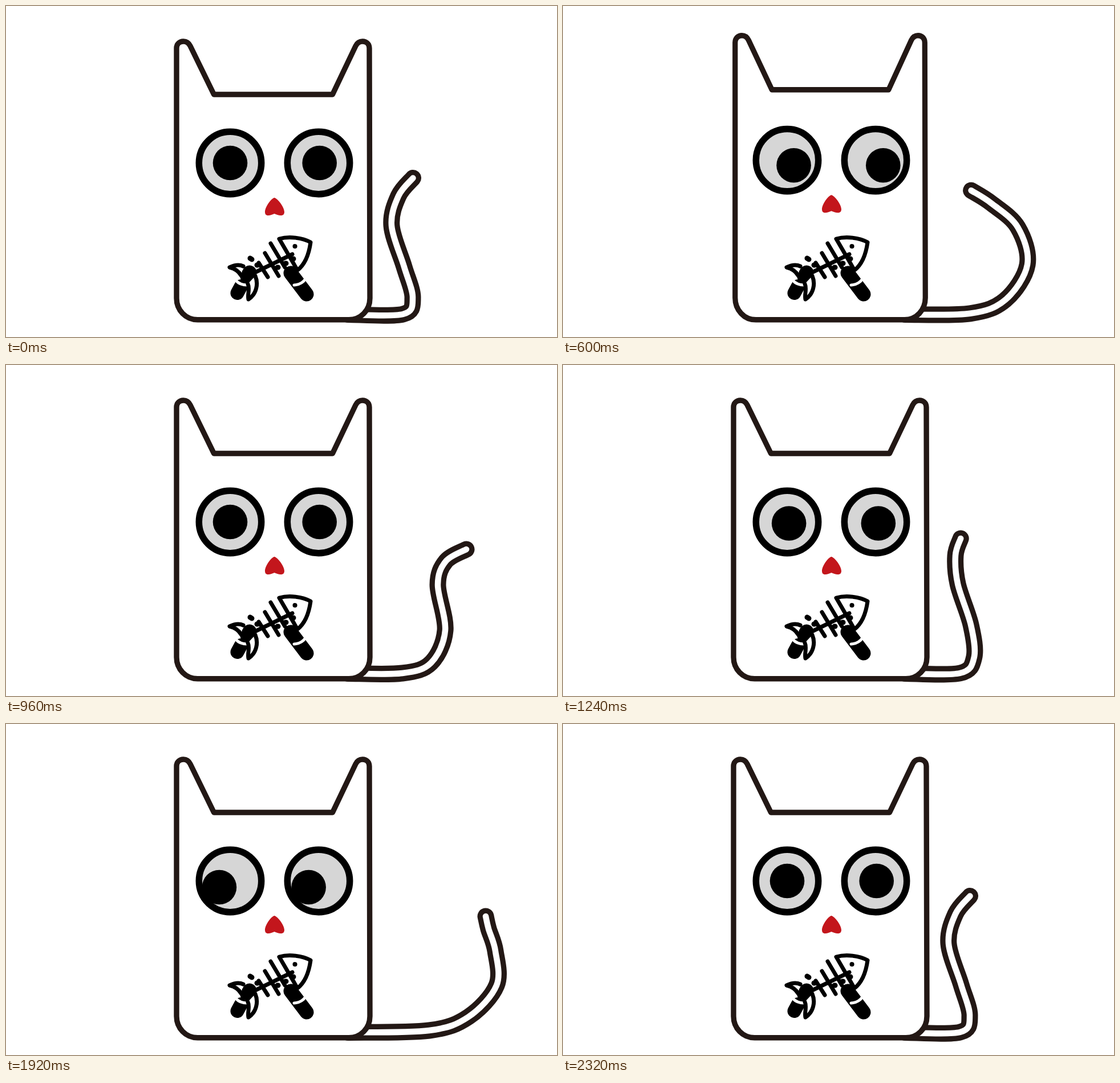
Animation, 966 px wide and 580 px high, one loop 2.36 s. Source, as an HTML page:

```html
<!DOCTYPE html>
<html lang="en">
<head>
<meta charset="utf-8">
<title>Cat</title>
<style>
  html, body { margin: 0; height: 100%; overflow: hidden; background: #fff; }
  svg { display: block; }
  .tail { fill: none; stroke: #231815; stroke-width: 29; stroke-linecap: round; }
  .tail.inside { stroke: #fff; stroke-width: 10.5; }
  .body { fill: #fff; stroke: #231815; stroke-width: 9.4; stroke-linejoin: round; }
  .fish { fill: none; stroke: #000; stroke-width: 7; stroke-linecap: round; stroke-linejoin: round; }
</style>
</head>
<body>
<svg width="966" height="580" viewBox="0 0 966 580">
  <path class="tail"/>
  <path class="tail inside"/>
  <path id="body" class="body" d="M364.5 155 L323 70 C320 64 316 62 311 62 C304 62 299 67 299 74
    V512 C299 533 315 549.8 336 549.8 H601 C622 549.8 638 533 638 512
    L637 74 C637 67 632 62 625 62 C620 62 616 64 613 70 L572.5 155 Z"/>
  <g id="face">
    <g fill="#d6d6d6" stroke="#000" stroke-width="11.5">
      <circle cx="393" cy="275" r="54.7"/>
      <circle cx="548" cy="275" r="54.7"/>
    </g>
    <g id="pupils">
      <circle cx="393" cy="275" r="30.3"/>
      <circle cx="549.7" cy="275" r="30.3"/>
    </g>
    <path fill="#c3161c" d="M470.5 336 C476 337 488 352 488 361 C488 370 477 367 470.5 364
      C464 367 454 370 454 361 C454 352 465 337 470.5 336 Z"/>
  </g>
  <g class="fish">
    <path stroke-width="25" d="M499 468 L527 505"/>
    <path stroke-width="24" d="M412 491 L405.5 503"/>
    <path stroke-width="25" d="M427 467 L423 474"/>
    <path fill="#fff" d="M479 408 C496 403 520 406 534 414 C531 436 524 453 511 463 Z"/>
    <path stroke="#fff" stroke-width="5" d="M505 489 Q519 488 525 478 M403 481 Q410 489 423 489"/>
    <path fill="#fff" d="M424 487 C428 495 423 505 425 514 C439 505 443 487 437 473"/>
    <path fill="#fff" d="M416 456 C408 452 400 454 392 458 C401 460 408 465 412 472"/>
    <path d="M424 473 L502 435 M464 416 L489 458 M454 433 L478 473 M443 450 L459 475"/>
    <path stroke-width="9" d="M428 442 L431 444 M440 454 h1 M476 458 h1 M490 451 h1 M503 443 h1"/>
    <path stroke-width="8" d="M506.5 421 h.1"/>
  </g>
</svg>
<script>
const FRAME_MS = 40, FRAMES = 59, TAIL_CYCLE = 29;
const tailPaths = document.querySelectorAll(".tail");
const body = document.getElementById("body");
const face = document.getElementById("face");
const pupils = document.getElementById("pupils");

// Numbers, or nested lists of them.
const mix = (a, b, u) => Array.isArray(a) ? a.map((v, i) => mix(v, b[i], u)) : a + (b - a) * u;

// Keys are [frame, value]; linear between neighbours, held outside.
function track(keys, frame) {
  const next = keys.findIndex(k => k[0] > frame);
  if (next < 0) return keys[keys.length - 1][1];
  if (next === 0) return keys[0][1];
  const [t0, a] = keys[next - 1], [t1, b] = keys[next];
  return mix(a, b, (frame - t0) / (t1 - t0));
}

// Points along the middle of the tail, from the root to the tip.
const root = [600, 540.5];
const upright = [[696, 540], [713, 511], [698, 457], [676, 385], [688, 333], [713.5, 301.5]];
const tucked = [[695, 540], [752, 516], [783.5, 450], [757, 381], [688, 337], [632, 314]];
const swept = [[742, 537], [811, 513], [860, 458], [858, 398], [846, 359], [841, 337]];
const curled = [[695, 540], [745, 522], [770, 465], [757, 385], [771, 344], [807, 323]];

const tailKeys = [[0, upright], [10, tucked], [14, mix(tucked, swept, 0.25)],
  [19, swept], [24, curled], [29, upright]];
const stretchKeys = [[14, 0], [18, 1], [22, 0]];
// Pupil offset as radius and angle in degrees.
const gazeKeys = [[0, [0, 38]], [10, [19.6, 38]], [14, [19.6, 38]], [18, [0, 38]],
  [29, [0, 38]], [38, [18, 38]], [48, [22, 150]], [58, [0, 150]]];

// Smooth open curve through all points.
function smoothPath(points) {
  const at = i => points[Math.max(0, Math.min(points.length - 1, i))];
  const handle = (i, side) => at(i).map((v, k) => v + side * (at(i + 1)[k] - at(i - 1)[k]) / 6);
  return points.map((p, i) => i ? `C${handle(i - 1, 1)} ${handle(i, -1)} ${p}` : `M${p}`).join("");
}

function draw(time) {
  const frame = Math.floor(time / FRAME_MS) % FRAMES;
  const curve = smoothPath([root, ...track(tailKeys, frame % TAIL_CYCLE)]);
  for (const path of tailPaths) path.setAttribute("d", curve);

  const stretch = track(stretchKeys, frame);
  body.setAttribute("transform",
    `translate(468.5 550) scale(${1 - 0.065 * stretch} ${1 + 0.084 * stretch}) translate(-468.5 -550)`);
  face.setAttribute("transform", `translate(0 ${-19.5 * stretch})`);

  const [radius, degrees] = track(gazeKeys, frame);
  const angle = degrees * Math.PI / 180;
  pupils.setAttribute("transform",
    `translate(${radius * Math.cos(angle)} ${radius * Math.sin(angle)})`);
}

const start = performance.now();
function loop() {
  draw(performance.now() - start);
  requestAnimationFrame(loop);
}
loop();
</script>
</body>
</html>
```
